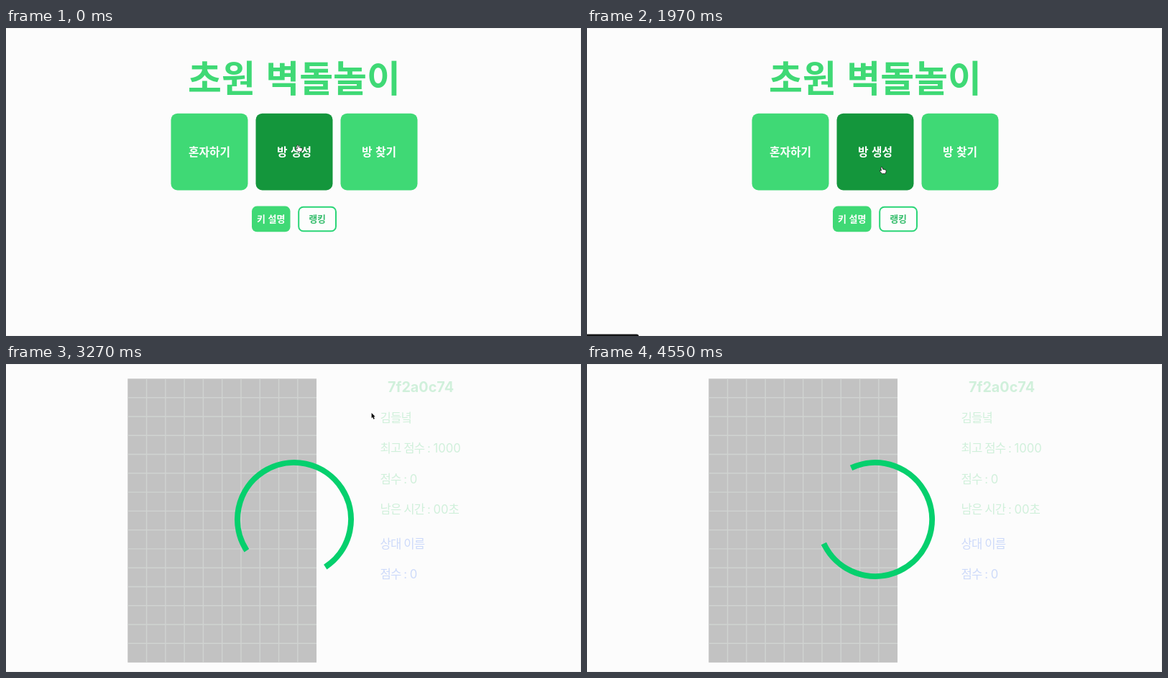
Animation, 800 px wide and 428 px high, one loop 4.58 s. Source, as an HTML page:

```html
<!DOCTYPE html>
<html lang="ko">
<head>
<meta charset="utf-8">
<style>
html, body { margin: 0; width: 100%; height: 100%; overflow: hidden; background: #fcfcfc; }
svg { display: block; width: 800px; height: 428px; }
text { font-family: "Noto Sans CJK KR", "Noto Sans CJK", sans-serif; font-weight: 700; }
#menu text { text-anchor: middle; }
#game text { font-family: Inter, "Noto Sans CJK KR", sans-serif; font-size: 16.7px; font-weight: 400; word-spacing: -.06em; }
#game .ko { letter-spacing: -.05em; }
#game .room { font-size: 19.8px; font-weight: 700; }
</style>
</head>
<body>
<svg viewBox="0 0 800 428">
  <rect width="800" height="428" fill="#fcfcfc"/>
  <path d="M0 .5H799.5V427.5H0" fill="none" stroke="#f1f1f1"/>
  <g id="menu"></g>
  <g id="game">
    <rect x="169.3" y="20.4" width="262.7" height="394.4" fill="#c2c2c2"/>
    <path id="grid" fill="none" stroke="#d0d3d1" stroke-width="1.4"/>
    <g id="labels"></g>
    <circle id="ring" cx="401" cy="216" r="79" fill="none" stroke="#05d06d" stroke-width="8"
      pathLength="360" stroke-dasharray="270 90"/>
  </g>
  <path id="status" d="M0 425.5H69Q72 425.5 72 428V432H0Z" fill="#161718"/>
  <g id="cursor">
    <path id="hand" transform="translate(-1.5 .3)"
      d="M-.2 1Q.9-.6 2 1L2.6 3.4 6.2 4.2Q7.6 4.7 7.2 6.6L6.3 9.6H1.6L-1.8 6.2Q-1.8 4.7-.2 5.2L.5 5.4Z"
      fill="#fff" stroke="#111" stroke-width=".8" stroke-linejoin="round"/>
    <path id="arrow" d="M0 0V7.3L1.6 5.9 2.8 8.7 4.2 8.1 3 5.3H5Z"
      fill="#000" stroke="#fff" stroke-width=".8" paint-order="stroke"/>
  </g>
</svg>
<script>
const LOOP = 4580, FPS = 33, SWITCH = 2240;
const $ = id => document.getElementById(id);

function add(parent, tag, attrs, html = '') {
  const el = document.createElementNS('http://www.w3.org/2000/svg', tag);
  for (const k in attrs) el.setAttribute(k, attrs[k]);
  el.innerHTML = html;
  parent.append(el);
}

function label(x, y, size, fill, str) {
  add($('menu'), 'text', { x, y, 'font-size': size, fill }, str);
}

function button(x, y, w, h, rx, fill, size, str, stroke = 'none', ink = '#fff') {
  add($('menu'), 'rect', { x, y, width: w, height: h, rx, fill, stroke, 'stroke-width': 2 });
  label(x + w / 2, y + h / 2 + size * .37, size, ink, str);
}

const GREEN = '#3fd975';
label(401, 89, 51, GREEN, '초원 벽돌놀이');
button(229.5, 118.7, 107, 106.8, 9, GREEN, 15.8, '혼자하기');
button(347.5, 118.7, 107, 106.8, 9, '#14963c', 15.8, '방 생성');
button(465.5, 118.7, 107, 106.8, 9, GREEN, 15.8, '방 찾기');
button(342, 247.6, 53.5, 35.6, 7, GREEN, 13, '키 설명');
button(407.2, 248.7, 51.8, 33.6, 6.5, '#fdfdfd', 13, '랭킹', '#2bd577', '#34bd6b');

const cell = 26.28;
let lines = '';
for (let i = 1; i < 10; i++) lines += `M${169.3 + i * cell} 20.4v394.4`;
for (let i = 1; i < 15; i++) lines += `M169.3 ${20.4 + i * cell}h262.7`;
$('grid').setAttribute('d', lines);

const MINT = '#d0f0db', BLUE = '#cddafa';
add($('labels'), 'text', { x: 531, y: 39, fill: MINT, class: 'room' }, '7f2a0c74');
[
  [81, '김들녘', MINT],
  [123, '최고 점수 : 1000', MINT],
  [165.5, '점수 : 0', MINT],
  [207.5, '남은 시간 : 00초', MINT],
  [255.5, '상대 이름', BLUE],
  [298, '점수 : 0', BLUE]
].forEach(([y, str, fill]) => add($('labels'), 'text', { x: 520.5, y, fill },
  str.replace(/[가-힣]+/g, '<tspan class="ko">$&</tspan>')));

// pointer stops: [ms, x, y]
const path = [
  [0, 406.5, 162], [1120, 404, 199.2], [1380, 398, 176], [1640, 410.5, 192.5],
  [2760, 410.5, 192.5], [3270, 508, 68], [3760, 617, 55], [3865, 650, 52], [4400, 605, 47]
];

function cursorAt(t) {
  const i = path.findIndex(p => p[0] > t);
  if (i < 0) return path.at(-1).slice(1);
  const [t0, x0, y0] = path[i - 1], [t1, x1, y1] = path[i];
  const k = (t - t0) / (t1 - t0);
  return [x0 + (x1 - x0) * k, y0 + (y1 - y0) * k];
}

const clamp = v => Math.max(0, Math.min(1, v));
const show = (id, on) => { $(id).style.display = on ? '' : 'none'; };

function draw(ms) {
  // the picture ticks at a fixed rate
  const t = Math.floor((ms % LOOP + 5) * FPS / 1000) * 1000 / FPS;
  const game = t >= SWITCH;
  show('menu', !game);
  show('game', game);
  show('hand', !game);
  show('arrow', game);
  show('cursor', t < 4410);
  $('cursor').setAttribute('transform', `translate(${cursorAt(t)})`);
  $('ring').setAttribute('transform', `rotate(${135 + .36 * (t - SWITCH)} 401 216)`);
  $('status').setAttribute('opacity', clamp((t - 1820) / 120) * clamp((2690 - t) / 250));
}

const start = performance.now();
(function tick() {
  draw(performance.now() - start);
  requestAnimationFrame(tick);
})();
</script>
</body>
</html>
```
